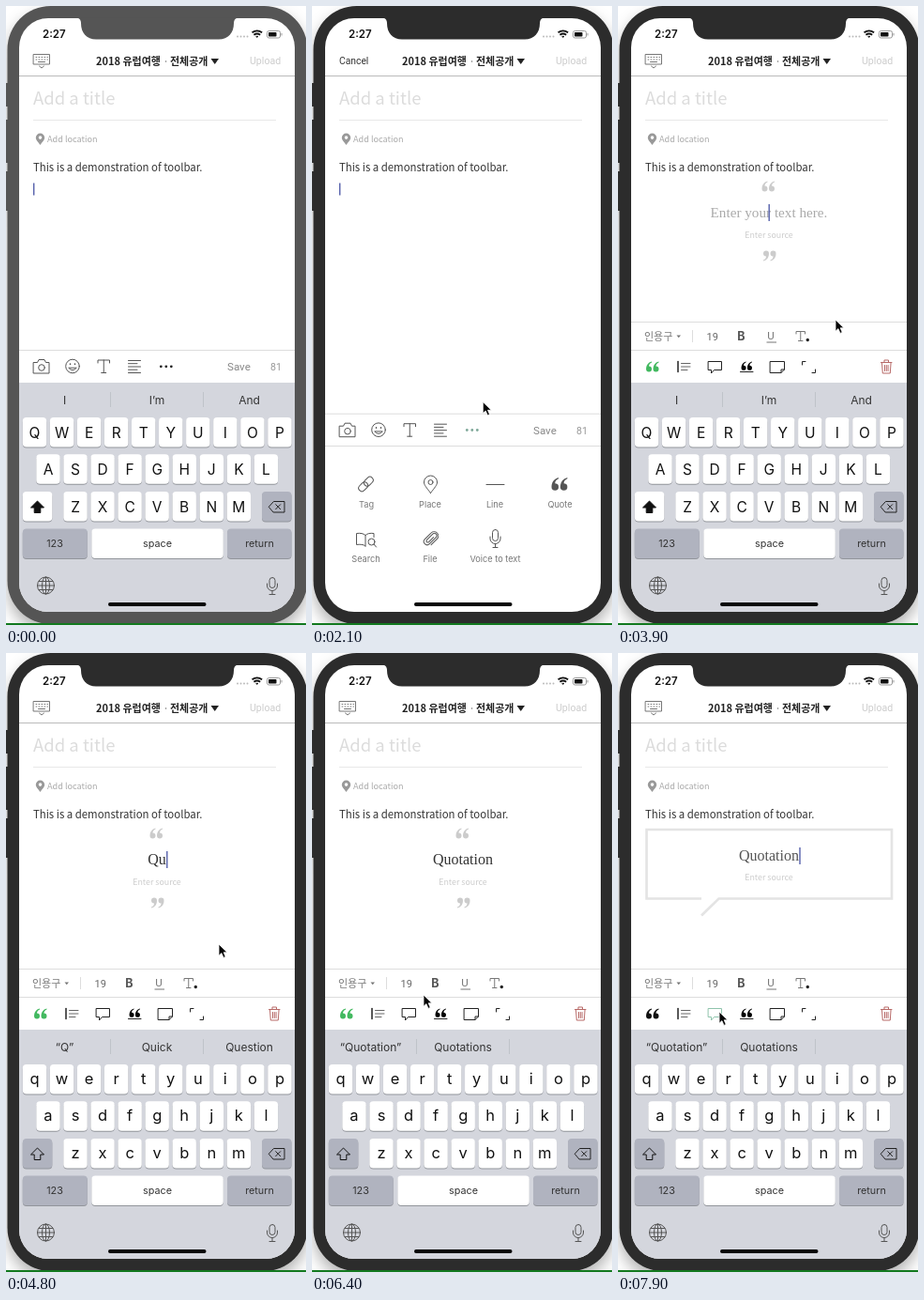
An HTML page for the animation above (8 s loop, 320x659 px).

```html
<!DOCTYPE html>
<html lang="en">
<head>
<meta charset="utf-8">
<title>Editor toolbar</title>
<style>
html, body { margin: 0; width: 100%; height: 100%; overflow: hidden; background: #fff; }
svg { display: block; width: 320px; height: 659px; }
text { font-family: Inter, sans-serif; fill: #333; }
.mid { text-anchor: middle; }
.ui { font-family: Roboto, sans-serif; }
.cjk { font-family: 'Noto Sans CJK KR', 'Noto Sans', sans-serif; }
.serif { font-family: 'Liberation Serif', serif; }
.line { fill: none; stroke: #555; stroke-width: 1; stroke-linecap: round; stroke-linejoin: round; }
.rule { fill: none; stroke: #ddd; }
.label { font-size: 9.2px; fill: #777; text-anchor: middle; }
.key { fill: #fff; }
.gray { fill: #b0b3bf; }
#body { filter: drop-shadow(0 8px 8px rgba(0, 0, 0, .3)); }
</style>
</head>
<body>
<svg viewBox="0 0 320 659" xmlns="http://www.w3.org/2000/svg">
<defs>
  <clipPath id="screen"><rect x="14" y="13" width="294" height="632" rx="31"/></clipPath>
  <g id="mark">
    <path id="six" d="M6 0C2 1 0 4 0 8a3 3 0 1 0 3-3C3 3 4 2 6 1Z"/>
    <use href="#six" x="7.5"/>
  </g>
</defs>

<g id="body">
  <path d="M0 82h2v25H0zM0 121h2v46H0zM0 176h2v42H0z"/>
  <rect x="1.5" y="0" width="320" height="658" rx="46"/>
</g>
<rect y="657" width="320" height="2" fill="#12791f"/>

<g clip-path="url(#screen)">
  <rect x="14" y="13" width="294" height="632" fill="#fff"/>

  <!-- status bar and header -->
  <text x="39" y="34" font-size="11.5" font-weight="600" style="fill:#111">2:27</text>
  <g fill="#bbb"><circle cx="247" cy="32.5" r="1"/><circle cx="250.5" cy="32.5" r="1"/><circle cx="254" cy="32.5" r="1"/><circle cx="257.500" cy="32.5" r="1"/></g>
  <g fill="none" stroke="#111" stroke-width="1.8"><path d="M262.500 28.300q5.300-4 10.600 0M264.400 30.700q3.400-2.400 6.800 0"/><path d="M266.700 32.400h2.200l-1.100 1z" stroke-width="1"/></g>
  <rect x="278.500" y="26.500" width="14" height="7.500" rx="2" fill="none" stroke="#999"/>
  <rect x="280" y="28" width="8.500" height="4.500" rx=".8" fill="#111"/>
  <path d="M294 29v2.500" stroke="#999"/>

  <g id="hide" class="line" style="stroke:#777">
    <path d="M29.500 51.500h17v10.500h-17zM35.500 64l2.500 2 2.500-2"/>
    <path d="M32 54.500h12.500M32 57h12.500" stroke-dasharray=".8 2.200"/><path d="M34.500 59.500h7"/>
  </g>
  <text id="cancel" class="ui" x="29" y="62" font-size="10.3">Cancel</text>
  <g font-size="11" font-weight="700">
    <text class="cjk" x="96" y="62.500" style="fill:#222">2018 유럽여행</text>
    <text class="cjk" x="175" y="62.500" style="fill:#222">전체공개</text>
  </g>
  <circle cx="170.500" cy="59" r=".8" fill="#777"/>
  <path d="M218.500 56h8.500l-4.250 6z" fill="#222"/>
  <text class="ui" x="260" y="62" font-size="10.6" style="fill:#ccc">Upload</text>
  <path d="M14 74.500H308" stroke="#bbb"/>

  <!-- document -->
  <text class="cjk" x="29" y="105" font-size="18.5" font-weight="300" style="fill:#dcdcdc">Add a title</text>
  <path class="rule" d="M29 121.500H288" style="stroke:#e8e8e8"/>
  <path fill="#999" fill-rule="evenodd" d="M36.500 148c-3-4-4.700-5.500-4.700-7.700a4.700 4.700 0 0 1 9.400 0c0 2.200-1.700 3.700-4.700 7.700zm0-9.700a1.800 1.800 0 1 0 0 3.600 1.800 1.800 0 0 0 0-3.600z"/>
  <text class="cjk" x="44" y="145.300" font-size="9.15" style="fill:#aaa">Add location</text>
  <text class="cjk" x="29" y="176" font-size="11.4" font-weight="300" style="fill:#333">This is a demonstration of toolbar.</text>

  <g id="marks" fill="#ccc">
    <use href="#mark" transform="translate(153.500 186.500)"/>
    <use href="#mark" transform="translate(168.500 271.500) rotate(180)"/>
  </g>
  <g id="bubble" fill="none" stroke="#e4e4e4" stroke-width="2.7">
    <path d="M89 261.500H30.500V188H292V261.500H107.500L89 279.500"/>
  </g>
  <g id="quote">
    <text id="typed" class="serif mid" x="161"/>
    <text id="source" class="cjk mid" x="161" font-size="8.85" style="fill:#ccc">Enter source</text>
  </g>
  <rect id="caret" width="1.4" fill="#5560ab"/>

  <!-- main toolbar -->
  <g id="tools">
    <path class="rule" d="M14 366.500H308"/>
    <g class="line">
      <path d="M29.500 379.500h4l1.500-3h6l1.500 3h3.500v11.500h-16.500z"/><circle cx="38" cy="385" r="3.300"/>
      <circle cx="71" cy="383.500" r="7.300"/><path d="M67 385.500q4 4.500 8 0z"/><path d="M68.500 381v.6M73.500 381v.6" stroke-width="1.500"/>
      <path d="M98 380v-3h12.500v3M104.250 377v13.500M101.700 390.500h5"/>
      <path d="M130.500 377.500h13M130.500 380.700h9.500M130.500 384h13M130.500 387.200h9.500M130.500 390.500h13"/>
    </g>
    <g id="dots"><circle cx="165.300" cy="383.800" r="1.400"/><circle cx="170.800" cy="383.800" r="1.400"/><circle cx="176.300" cy="383.800" r="1.400"/></g>
    <text class="ui" x="236" y="388" font-size="11.6" style="fill:#888">Save</text>
    <text class="ui" x="282" y="388" font-size="10.7" style="fill:#999">81</text>
  </g>

  <!-- quote toolbar -->
  <g id="format">
    <path class="rule" d="M14 336.500H308M14 366.500H308"/>
    <path class="rule" d="M79.500 345v13"/>
    <text class="cjk" x="28" y="356" font-size="11" style="fill:#777">인용구</text>
    <path d="M62.500 350.500h4.500l-2.250 2.800z" fill="#777"/>
    <text class="ui" x="94.500" y="356" font-size="11" style="fill:#666">19</text>
    <text x="127.300" y="356" font-size="12.500" font-weight="700" style="fill:#555">B</text>
    <text class="ui" x="159.200" y="355" font-size="11.500" style="fill:#777">U</text>
    <path d="M158.500 358h10.500" stroke="#777"/>
    <path class="line" style="stroke:#777" d="M190 349v-2.500h9.500v2.500M194.750 346.500v10M192.500 356.500h4.500"/>
    <circle cx="202.300" cy="355.500" r="1.700" fill="#222"/>
    <use id="pick" href="#mark" transform="translate(30 378.500)"/>
    <g class="line" style="stroke:#222">
      <path d="M64 378.500v11" stroke-width="1.500"/><path d="M67.500 380.500h9.500M67.500 384h9.500M67.500 387.500h6.500" style="stroke:#666"/>
      <path id="talk" d="M96.500 378.500h14v9h-8l-3 3.500v-3.500h-3z"/>
      <path d="M130.500 389.500h13.500"/>
      <path d="M162.500 378.500h15v8.500l-3.500 3.500h-11.500zM177.500 387h-3.500v3.500"/>
      <path d="M200 378.500h-3.500v3.500M207 390.500h3.500v-3.500"/>
    </g>
    <use href="#mark" transform="translate(131.500 378.500) scale(.85)"/>
    <g class="line" style="stroke:#b86a68"><path d="M280.500 379.500h11.500M284 379.500v-2.500h4.500v2.500M281.500 379.500l.8 11.500h8l.8-11.500M284.500 382.500v6M286.300 382.500v6M288.100 382.500v6"/></g>
  </g>

  <!-- insert panel -->
  <g id="panel">
    <path class="rule" d="M14 468.500H308"/>
    <g class="line">
      <g transform="rotate(-45 57.500 509)"><rect x="48" y="505.500" width="11" height="7" rx="3.500"/><rect x="56" y="505.500" width="11" height="7" rx="3.500"/></g>
      <path d="M126.500 518.500c-4.500-6-7-8.500-7-11.500a7 7 0 0 1 14 0c0 3-2.500 5.500-7 11.500z"/><circle cx="126.500" cy="507" r="2.500"/>
      <path d="M186 509.500h19"/>
      <path d="M57 575c-2-2-6-2-9.500-1.500v-12c4-.5 7.500 0 9.500 2 2-2 5-2.500 9-2v4M57 563.500v11.500"/>
      <circle cx="63.500" cy="570.500" r="3.500"/><path d="M66 573l2.500 3"/>
      <g transform="rotate(45 126 567)"><path d="M122.500 564v7.500a3.500 3.500 0 0 0 7 0v-10a2.500 2.500 0 0 0-5 0v9a1.300 1.300 0 0 0 3 0v-7M122.500 564v-2a4.500 4.500 0 0 1 9 0v9"/></g>
      <rect x="192.500" y="557.500" width="6" height="12" rx="3"/><path d="M190 565v2a5.500 5.500 0 0 0 11 0v-2M195.500 572.500v4M193 576.500h5"/>
    </g>
    <use id="quoteIcon" href="#mark" transform="translate(255.500 502) scale(1.25)"/>
    <text class="label" x="58" y="534.300">Tag</text>
    <text class="label" x="126" y="534.300">Place</text>
    <text class="label" x="195" y="534.300">Line</text>
    <text class="label" id="quoteLabel" x="264.500" y="534.300">Quote</text>
    <text class="label" x="57.500" y="592.300">Search</text>
    <text class="label" x="126" y="592.300">File</text>
    <text class="label" x="195.500" y="592.300">Voice to text</text>
  </g>

  <g id="keyboard">
    <rect x="14" y="401" width="294" height="244" fill="#d4d6dd"/>
    <path d="M111.500 411v16M210.500 411v16" stroke="#bfc3c9"/>
    <g font-size="12"><text class="mid hint" x="62.500" y="423.500"/><text class="mid hint" x="161" y="423.500"/><text class="mid hint" x="259.500" y="423.500"/></g>
    <g id="keys"></g>
    <path id="shift" d="M33.500 527l7 7h-3.700v5.500h-6.600v-5.500h-3.700z" stroke="#111" stroke-linejoin="round"/>
    <path class="line" style="stroke:#222" d="M280.500 533l5-5.500h11.500v11.500h-11.500zM287.700 530.700l5 5M292.700 530.700l-5 5"/>
    <g font-size="10.8"><text class="mid" x="52" y="576">123</text><text class="mid" x="161.500" y="576">space</text><text class="mid" x="270.500" y="576">return</text></g>
    <g class="line">
      <circle cx="42.500" cy="617" r="9"/><ellipse cx="42.500" cy="617" rx="4" ry="9"/><path d="M42.500 608v18M33.500 617h18M35 612.500h15M35 621.500h15"/>
      <rect x="281" y="608.500" width="6" height="11" rx="3"/><path d="M278.500 615v2a5.500 5.500 0 0 0 11 0v-2M284 622.500v4M281 626.500h6"/>
    </g>
  </g>
  <rect x="109" y="635" width="104.500" height="4" rx="2" fill="#050505"/>
</g>

<path id="notch" d="M74 12.500c4 0 6 2 6 6 0 10 6 17 16 17h131c10 0 16-7 16-17 0-4 2-6 6-6z"/>

<circle id="ring" r="19" fill="none" stroke="#111" stroke-width="1.500"/>
<path id="pointer" d="M0 0v12.300l2.900-2.700 2.100 4.800 2.200-1-2-4.600h3.800z" fill="#050505" stroke="#fff" stroke-width=".8"/>
</svg>

<script>
const LOOP = 8000, WORD = 'Quotation';
const FOCUS = 1200, PANEL = 1400, QUOTE = 3600, TYPE = 4600, DONE = 5700, BUBBLE = 7100;
const strokes = [TYPE, 4700, 4850, 5000, 5150, 5300, 5450, 5600, DONE];
const clicks = [[FOCUS, PANEL], [3100, 3300], [6800, 7000]];
// time, x, y of the pointer tip
const path = [
  [300, 225, 644], [1000, 167, 380], [1850, 167, 380], [2700, 219, 521],
  [2850, 219, 521], [3150, 258, 510], [3500, 258, 510], [3900, 232, 334],
  [4300, 227, 310], [5850, 227, 310], [6400, 119, 364], [6700, 108, 382], [LOOP, 108, 382]
];
const $ = id => document.getElementById(id);
const show = (id, on) => $(id).style.display = on ? '' : 'none';
const fill = (id, color) => $(id).style.fill = color;
const within = (t, [a, b]) => t >= a && t < b;
const clamp = v => Math.max(0, Math.min(1, v));

function buildKeys() {
  const key = (x, y, w, type = 'key', id = '') =>
    `<rect x="${x}" y="${y + 1}" width="${w}" height="31.5" rx="4" fill="#92959b"/>` +
    `<rect id="${id}" class="${type}" x="${x}" y="${y}" width="${w}" height="31.5" rx="4"/>`;
  let out = '';
  [['QWERTYUIOP', 30.5, 438], ['ASDFGHJKL', 45, 477.3], ['ZXCVBNM', 74, 517]].forEach(([row, x0, y]) => {
    [...row].forEach((c, i) => {
      const x = x0 + i * 29.05;
      out += key(x - 12.7, y, 25.4) + `<text class="mid letter" x="${x}" y="${y + 21.5}" style="fill:#111">${c}</text>`;
    });
  });
  out += key(17.8, 517, 31.5, 'key', 'shiftKey') + key(273, 517, 31.5, 'gray');
  out += key(17.8, 556.5, 69, 'gray') + key(91.3, 556.5, 140.5) + key(236, 556.5, 68.5, 'gray');
  $('keys').innerHTML = out;
}
buildKeys();
const letters = document.querySelectorAll('.letter');
const hints = document.querySelectorAll('.hint');

function drawPointer(t) {
  const i = path.findIndex(p => p[0] > t);
  show('pointer', i > 0);
  show('ring', clicks.some(c => within(t, c)));
  if (i < 1) return;
  const [a, x, y] = path[i - 1], [b, x2, y2] = path[i];
  const k = (t - a) / (b - a);
  const px = x + (x2 - x) * k, py = y + (y2 - y) * k;
  $('pointer').setAttribute('transform', `translate(${px} ${py})`);
  $('ring').setAttribute('transform', `translate(${px - .5} ${py})`);
}

function drawKeyboard(t) {
  const lower = t >= TYPE;
  letters.forEach(el => {
    el.textContent = lower ? el.textContent.toLowerCase() : el.textContent.toUpperCase();
    el.setAttribute('font-size', lower ? 16.5 : 15.5);
    el.setAttribute('dy', lower ? -1 : 0);
  });
  $('shiftKey').setAttribute('class', lower ? 'gray' : 'key');
  fill('shift', lower ? 'none' : '#111');
  const words = !lower ? ['I', 'I’m', 'And']
    : t < DONE ? ['“Q”', 'Quick', 'Question'] : ['“Quotation”', 'Quotations', ''];
  hints.forEach((el, i) => el.textContent = words[i]);
}

function drawQuote(t) {
  const bubble = t >= BUBBLE, typed = $('typed');
  const word = WORD.slice(0, strokes.filter(s => s <= t).length);
  show('quote', t >= QUOTE);
  show('marks', t >= QUOTE && !bubble);
  show('bubble', bubble);
  typed.textContent = word || 'Enter your text here.';
  typed.setAttribute('font-size', word ? 16 : 15.2);
  typed.setAttribute('y', bubble ? 220.5 : 224.5);
  typed.style.fill = !word ? '#aaa' : bubble ? '#555' : '#333';
  $('source').setAttribute('y', bubble ? 242.3 : 246.5);
  fill('pick', bubble ? '#111' : '#43b960');
  $('talk').style.stroke = bubble ? '#8fc4ac' : '#222';

  const caret = $('caret');
  const x = t < QUOTE ? 29 : word ? 161.3 + typed.getComputedTextLength() / 2 : 160.5;
  caret.setAttribute('x', x);
  caret.setAttribute('y', t < QUOTE ? 188.5 : bubble ? 207 : 211);
  caret.setAttribute('height', t < QUOTE ? 13 : 18);
  // one-second blink with short fades
  const start = t < QUOTE ? -400 : t < DONE ? QUOTE : DONE;
  const p = (t - start) % 1000;
  caret.style.opacity = within(t, [TYPE, DONE + 100]) ? 1
    : p < 500 ? clamp(p / 100) : clamp(1 - (p - 500) / 100);
}

function draw(t) {
  const panel = within(t, [PANEL, QUOTE]);
  const shell = t < FOCUS ? '#555' : '#2c2c2c';
  fill('body', shell);
  fill('notch', shell);
  show('hide', !panel);
  show('cancel', panel);
  show('panel', panel);
  show('keyboard', !panel);
  show('tools', t < QUOTE);
  show('format', t >= QUOTE);
  $('tools').setAttribute('transform', `translate(0 ${panel ? 67.7 : 0})`);
  fill('dots', panel ? '#7fa99a' : within(t, clicks[0]) ? '#c4c4c4' : '#222');
  const pressed = t >= 3300;
  fill('quoteIcon', pressed ? '#56b873' : '#555');
  fill('quoteLabel', pressed ? '#56b873' : '#777');
  drawKeyboard(t);
  drawQuote(t);
  drawPointer(t);
}

let begin;
function tick(now) {
  begin ??= now;
  draw((now - begin) % LOOP);
  requestAnimationFrame(tick);
}
draw(0);
requestAnimationFrame(tick);
</script>
</body>
</html>
```
